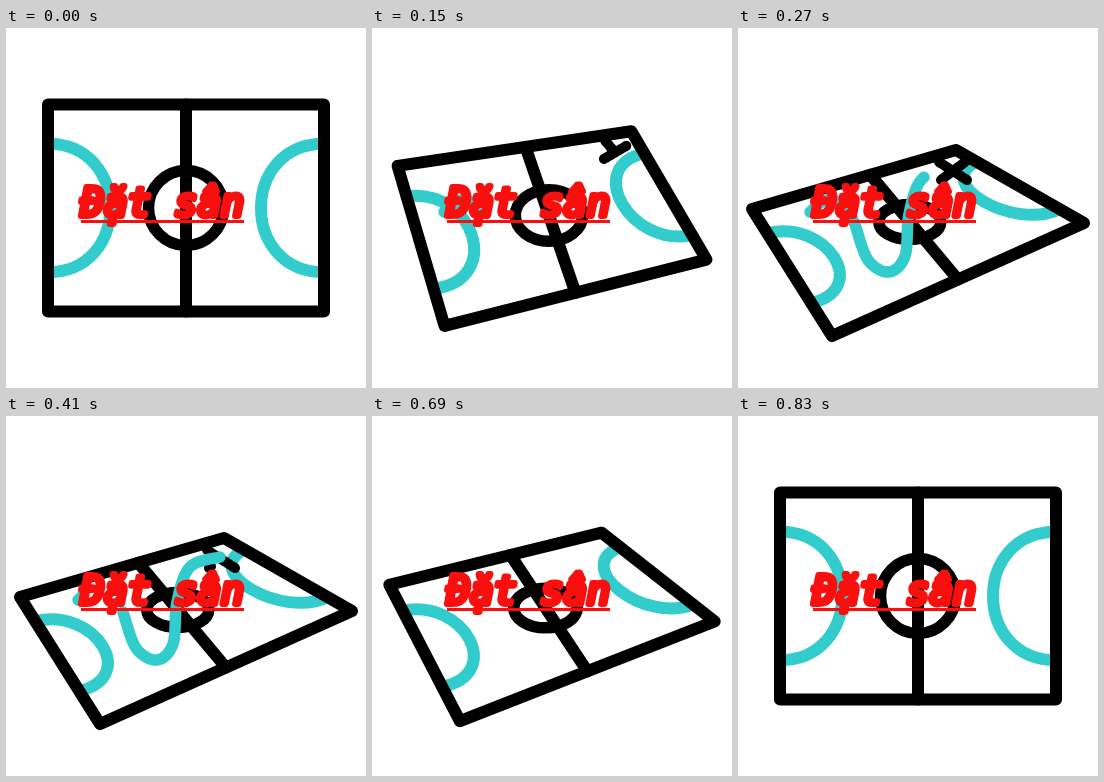
Write an HTML page with a canvas that moves like this. It is 360 by 360 pixels and loops after 0.88 s.

```html
<!DOCTYPE html>
<html lang="vi">
<head>
<meta charset="utf-8">
<title>Đặt sân</title>
<style>
html, body { margin: 0; width: 100%; height: 100%; overflow: hidden; background: #fff; }
canvas { display: block; width: 360px; height: 360px; }
</style>
</head>
<body>
<canvas id="stage" width="360" height="360"></canvas>
<script>
const ctx = document.getElementById('stage').getContext('2d');
const LOOP = 880, STEP = 20, FIRST = 70, LAST = 830;
const TEAL = '#33cccc', BLACK = '#000', RED = '#fa0f0f';
const CENTER = 180, HALF_W = 138, HALF_H = 103.5;

const ramp = (t, a, b) => Math.min(1, Math.max(0, (t - a) / (b - a)));
const sine = x => (1 - Math.cos(Math.PI * x)) / 2;
const easeOut = x => 1 - (1 - x) ** 2;
const mix = (a, b, u) => a.map((v, i) => v + (b[i] - v) * u);
const add = (a, b, k = 1) => a.map((v, i) => v + b[i] * k);

// Catmull-Rom curve through a few points, as a dense point list.
function spline(points, steps = 24) {
  const dense = [points[0]];
  const near = i => points[Math.min(points.length - 1, Math.max(0, i))];
  for (let i = 0; i + 1 < points.length; i++) {
    const [a, b, c, d] = [-1, 0, 1, 2].map(k => near(i + k));
    for (let s = 1; s <= steps; s++) {
      const u = s / steps;
      dense.push(b.map((v, k) => v + u / 2 * (c[k] - a[k] +
        u * (2 * a[k] - 5 * v + 4 * c[k] - d[k] + u * (3 * (v - c[k]) + d[k] - a[k])))));
    }
  }
  return dense;
}

const hook = spline([[72, 184], [88, 172], [106, 178], [117, 196]]);
const route = spline([[117, 196], [130, 232], [151, 244], [167, 228], [171, 186], [184, 151], [214, 141]]);

function stroke(color, width, path) {
  ctx.strokeStyle = color;
  ctx.lineWidth = width;
  ctx.beginPath();
  path();
  ctx.stroke();
}

function line(color, width, points) {
  stroke(color, width, () => points.forEach(p => ctx.lineTo(...p)));
}

function trimmed(color, width, points, from, to) {
  const last = points.length - 1;
  if (to > from) line(color, width, points.slice(Math.round(from * last), Math.round(to * last) + 1));
}

// An arc leaves a side of the court, swings inwards by push and returns.
function sideArc(a, b, start, end, push) {
  const from = mix(a, b, start), to = mix(a, b, end);
  stroke(TEAL, 12, () => {
    ctx.moveTo(...from);
    ctx.bezierCurveTo(...add(from, push), ...add(to, push), ...to);
  });
}

function drawCourt(tilt) {
  const corner = (sx, sy, tilted) =>
    mix([CENTER + sx * HALF_W, CENTER + sy * HALF_H], tilted, tilt);
  const topLeft = corner(-1, -1, [14, 181]), topRight = corner(1, -1, [218, 122]);
  const bottomRight = corner(1, 1, [346, 195]), bottomLeft = corner(-1, 1, [94, 308]);

  sideArc(topLeft, bottomLeft, 0.19, 0.81 - 0.07 * tilt, mix([83, 0], [60, -14], tilt));
  sideArc(topRight, bottomRight, 0.19 - 0.03 * tilt, 0.81, mix([-84, 0], [-45, 22], tilt));

  const top = mix(topLeft, topRight, 0.5 + 0.08 * tilt);
  const bottom = mix(bottomLeft, bottomRight, 0.5);
  line(BLACK, 12, [top, bottom]);
  stroke(BLACK, 12, () => {
    [topLeft, topRight, bottomRight, bottomLeft].forEach(p => ctx.lineTo(...p));
    ctx.closePath();
  });
  const [x, y] = mix(top, bottom, 0.5 - 0.05 * tilt);
  stroke(BLACK, 11.5, () =>
    ctx.ellipse(x, y, 37.5 - 6.5 * tilt, 37.5 - 20 * tilt, 0, 0, 2 * Math.PI));
}

function drawTactics(t, tilt) {
  const center = mix([283, 98], [215, 143], tilt);
  const cross = (arm, amount) =>
    trimmed(BLACK, 10, spline([add(center, arm, -1), add(center, arm)]), 0, amount);
  cross(mix([10, -3], [12, -9], tilt), ramp(t, 88, 122) - ramp(t, 340, 420));
  cross(mix([4, 15], [14, 9], tilt), ramp(t, 130, 180) - ramp(t, 430, 500));
  trimmed(TEAL, 11.5, hook, 0, ramp(t, 120, 165) - ramp(t, 320, 420));
  trimmed(TEAL, 11.5, route, sine(ramp(t, 548, 690)), easeOut(ramp(t, 160, 340)));
}

function drawLabel() {
  ctx.font = 'italic 38.7px "DejaVu Sans Mono", monospace';
  ctx.fillStyle = ctx.strokeStyle = RED;
  ctx.lineWidth = 6;
  ctx.fillText('Đặt sân', 75, 188);
  ctx.strokeText('Đặt sân', 75, 188);
  ctx.fillRect(75, 192, 163, 3);
}

function draw(now) {
  const time = now % LOOP;
  const t = time < FIRST ? 0 : Math.min(LAST, FIRST + Math.floor((time - FIRST) / STEP) * STEP);
  const tilt = sine(ramp(t, 60, 222)) - sine(ramp(t, 650, LAST));
  ctx.fillStyle = '#fff';
  ctx.fillRect(0, 0, 360, 360);
  ctx.lineCap = ctx.lineJoin = 'round';
  drawCourt(tilt);
  drawTactics(t, tilt);
  drawLabel();
}

const begin = performance.now();
function tick() {
  draw(performance.now() - begin);
  requestAnimationFrame(tick);
}
tick();
</script>
</body>
</html>
```
